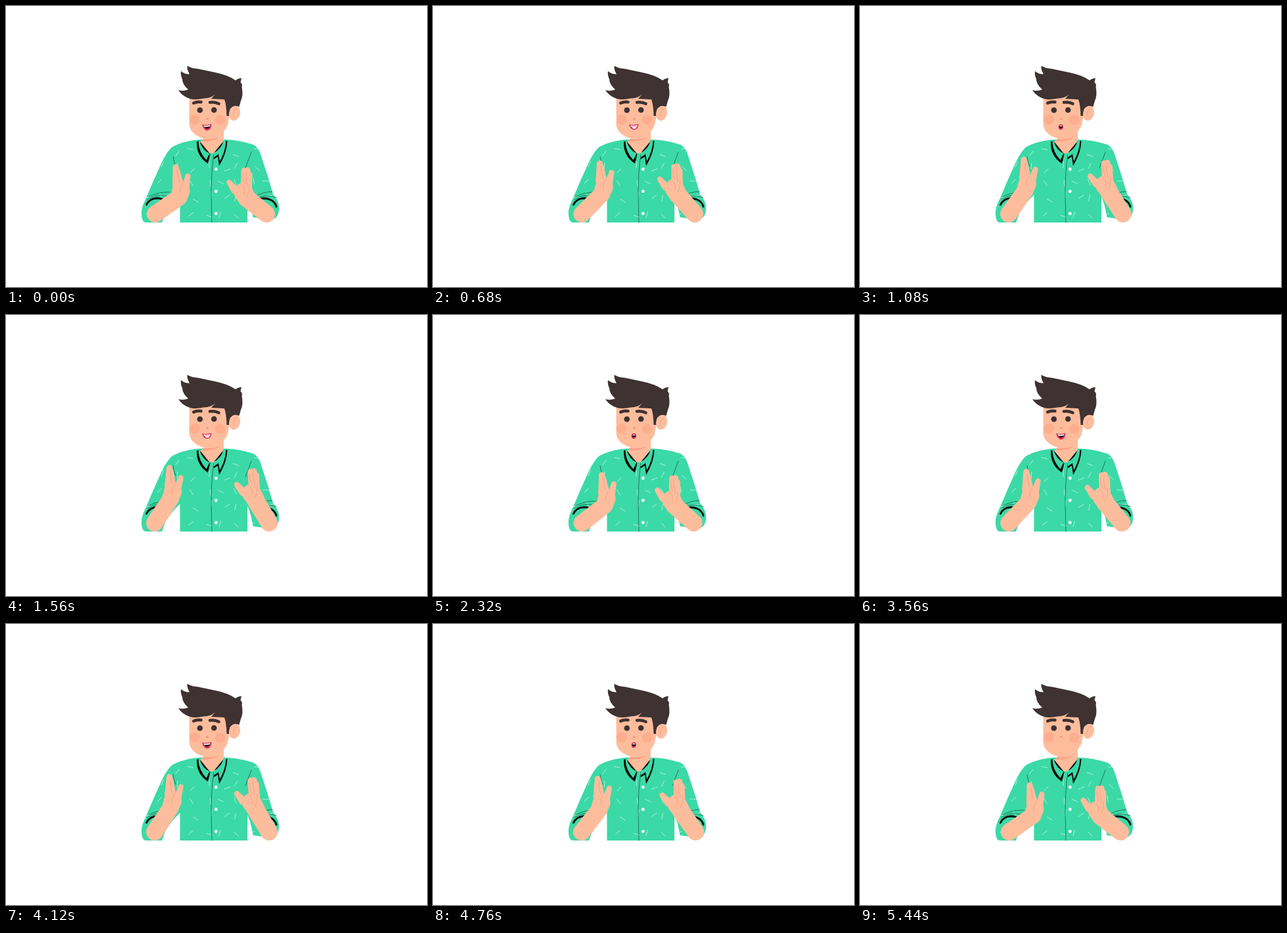
These frames come from a looping animation (640 px wide and 427 px high, 5480 ms). An HTML page with a canvas:

```html
<!DOCTYPE html>
<html lang="en">
<head>
<meta charset="utf-8">
<title>Talking man</title>
<style>
  html, body { margin: 0; width: 100%; height: 100%; overflow: hidden; background: #fff; }
  canvas { display: block; width: 640px; height: 427px; }
</style>
</head>
<body>
<canvas id="stage" width="640" height="427"></canvas>
<script>
const ctx = document.getElementById('stage').getContext('2d');
const LOOP = 5480, STEP = 40, CYCLE = 2820;
const SKIN = '#fdbd9d', CREASE = '#f0a083', BLUSH = '#fdae8f', HAIR = '#3e3232';
const GREEN = '#3bd9a6', FOLD = '#15604a', INK = '#050807', LIP = '#dc2b5c';

const fill = (d, color) => {
  ctx.fillStyle = color;
  ctx.fill(new Path2D(d));
};
const line = (d, color, width) => {
  ctx.strokeStyle = color;
  ctx.lineWidth = width;
  ctx.stroke(new Path2D(d));
};
const dot = (x, y, r, color) => {
  ctx.fillStyle = color;
  ctx.beginPath();
  ctx.arc(x, y, r, 0, Math.PI * 2);
  ctx.fill();
};

// Rounded limb whose radius goes from ra to rb
function limb([ax, ay], ra, [bx, by], rb) {
  const dir = Math.atan2(by - ay, bx - ax);
  const side = Math.acos((ra - rb) / Math.hypot(bx - ax, by - ay));
  ctx.fillStyle = SKIN;
  ctx.beginPath();
  ctx.arc(ax, ay, ra, dir + side, dir - side);
  ctx.arc(bx, by, rb, dir - side, dir + side);
  ctx.fill();
}

function seeded(seed) {
  return () => (seed = seed * 16807 % 2147483647) / 2147483647;
}

const BODY = 'M294 203C278 204 262 209 253 214Q246 219 237 237L224 266L212 294Q206 306 206 314' +
  'Q206 329 213 329H237L243 313Q252 299 264.5 287V329H367V290Q372 300 375.5 321L403 325' +
  'Q415 322 415 308Q416 298 406 286L399 262L388 228Q383 212 374 210Q355 204 335 203Z';
const FACE = 'M278.5 136V179C279 192 291 200 306 202Q328 201 337 181L341 160V130Z';
const HAIRDO = 'M275.500 91Q283 95 292 95.500L318 101Q338 105 349 113Q352 110 358 109.500L356.500 116' +
  'Q360 119 358.500 123Q361 136 357 144L354.500 153Q344 150 340 158V167H335.500Q335 150 332 142' +
  'L312 141L318 134Q312 140 300 140.500Q288 143 280 141Q269 138 262 128Q270 130 277 127' +
  'Q268 119 268 111Q265 105 266 99Q272 104 279 103.500Q275 97 275.500 91Z';

// Short strokes scattered on a jittered grid
function drawTicks() {
  const rnd = seeded(29), gap = 23;
  ctx.save();
  ctx.clip(new Path2D(BODY));
  for (let y = 222; y < 329; y += gap) {
    for (let x = 216; x < 412; x += gap) {
      const cx = x + (rnd() - 0.5) * 12, cy = y + (rnd() - 0.5) * 12, a = rnd() * Math.PI;
      const dx = Math.cos(a) * 4.500, dy = Math.sin(a) * 4.500;
      line(`M${cx - dx} ${cy - dy}L${cx + dx} ${cy + dy}`, '#c8f7e6', 0.8);
    }
  }
  ctx.restore();
}

function drawShirt() {
  fill(BODY, GREEN);
  drawTicks();
  line('M316 225Q312 250 312 285L313 329', FOLD, 0.8);
  for (let i = 0; i < 3; i++) dot(319.3, 248 + i * 33.700, 2.4, '#fff');
  line('M254 229Q255 237 258 244M373 222L364 246', FOLD, 0.8);
  line('M217 290Q231 282 249 283M215 294Q226 285 245 289', FOLD, 0.8);
  line('M378 290Q391 282 405 282M380 292Q394 286 411 291', FOLD, 0.8);
  line('M213.500 302Q218 292.500 229 292Q237 292 241.500 296', INK, 2.800);
  line('M382 294Q392 290.500 401 294Q409 297 411 305', INK, 2.800);
}

function drawNeck() {
  fill('M300 190V203L294 207Q298 224 311 224Q325 224 331 206V184Z', SKIN);
  fill('M299 202Q314 204 326 199Q318 206 299 206Z', '#ff9f87');
  fill('M290 206Q289 228 307 239.500L310.500 225L294 205Z', INK);
  fill('M294 204Q298 219 309.500 224L304.500 234Q293 222 292.500 206Z', GREEN);
  fill('M336.500 205Q336 223 324 243L322 229L315.500 233L317 222L331 205Z', INK);
  fill('M331 203Q328 217 316 223L316 230L323 225L325 236Q334 220 334.500 204Z', GREEN);
}

function drawHead() {
  fill(FACE, SKIN);
  fill(HAIRDO, HAIR);
  ctx.fillStyle = SKIN;
  ctx.beginPath();
  ctx.ellipse(347.500, 163, 8.500, 11.300, 0.25, 0, Math.PI * 2);
  ctx.fill();
  line('M351 156Q344 158 346 168', CREASE, 0.9);
  dot(287, 172.500, 7.800, BLUSH);
  dot(325.500, 173, 7.800, BLUSH);
  fill('M303.500 172Q306 168 308.500 172Q306 174 303.500 172Z', '#fb957c');
  line('M285.300 147.500Q290 145 296.500 146', HAIR, 4.600);
  line('M310 146.500Q317 145.500 323.500 148.500', HAIR, 4.600);
  dot(294.800, 158.200, 4.300, HAIR);
  dot(316.200, 158, 4.300, HAIR);
}

const mouths = {
  A() {
    fill('M298 180Q305 181.500 312.500 179.500Q312 189 305 189.500Q300 188 298 180Z', LIP);
    fill('M300 181.300Q305 182.500 310.500 181Q310 186 305.500 186.300Q302 186 300 181.300Z', INK);
    fill('M300 181.300Q305 182.500 310.500 181L310 183Q305 184.500 301 183.300Z', '#fff');
  },
  T() {
    fill('M298 180Q305 181.500 312.500 179.500Q312 188 305 188Q300 187.500 298 180Z', LIP);
    fill('M300 181.500Q305 182.500 311 181L310 183.500H301Z', '#fff');
    fill('M302.500 184H309.500Q309 186.500 305.500 186.500Q303 186.500 302.500 184Z', '#fff');
  },
  O() {
    fill('M301.500 183Q303 179 305.500 180Q308 179 309 183Q309 188 305 188.300Q301.500 188 301.500 183Z', LIP);
    fill('M303 182.500Q305 180.500 307.500 182.500V185.500H303Z', INK);
    fill('M303.500 182Q305 181 307 182V183H303.500Z', '#fff');
  }
};
const SPEECH = 'AOTAOATAOOATAOATOAAOTAA', SYLLABLE = 240;

// Hands are described from the palm, thumb towards +x; side -1 mirrors them
const arms = [
  { side: 1, palm: [266, 281], size: 13.500, elbow: [227, 316], slide: -1,
    tips: [[-8, -36], [-6, -31]], thumb: [10.500, -22.500], wrist: [-3, 10] },
  { side: -1, palm: [361, 283], size: 14.500, elbow: [396, 316], slide: -4,
    tips: [[-1, -33], [-6, -33.500], [-9, -27]], thumb: [21.500, -15], wrist: [-5, 9] }
];

function drawArm({ side, palm, size, elbow, slide, tips, thumb, wrist }, lift) {
  const x = palm[0] - 12.500 * side * lift, y = palm[1] - 12 * lift;
  ctx.save();
  ctx.translate(x, y);
  ctx.scale(side, 1);
  limb([(elbow[0] - x) * side + slide * lift, elbow[1] - y], 13, wrist, size - 1);
  ctx.rotate(0.08 * lift);
  limb(wrist, size - 1, [0, 0], size);
  tips.forEach(tip => limb([-4.500, -9], 8.500, tip, 4.400));
  limb([thumb[0] * 0.6, -3], 6, thumb, 4);
  const [tx, ty] = tips[0];
  line(`M${tx + 2} ${ty + 4}Q${tx + 3} -20 -2 -13M3 -12Q-3 -6 -1 3`, CREASE, 0.9);
  if (tips.length > 2) line('M-4 -31Q-3 -20 -6 -11M-9 -12Q-10 0 -4 7', CREASE, 0.9);
  ctx.restore();
}

const ease = u => (1 - Math.cos(Math.PI * Math.min(1, Math.max(0, u)))) / 2;
function liftAt(t) {
  const u = t % CYCLE;
  return ease((u - 100) / 1200) - ease((u - 1680) / 860);
}

function draw(t) {
  ctx.fillStyle = '#fff';
  ctx.fillRect(0, 0, 640, 427);
  drawShirt();
  drawNeck();
  drawHead();
  if (t < LOOP - 2 * STEP) mouths[SPEECH[Math.floor(t / SYLLABLE)]]();
  const lift = liftAt(t);
  arms.forEach(arm => drawArm(arm, lift));
}

ctx.lineCap = 'round';
const start = performance.now();
function tick() {
  const t = (performance.now() - start) % LOOP;
  draw(Math.floor(t / STEP) * STEP);
  requestAnimationFrame(tick);
}
tick();
</script>
</body>
</html>
```
